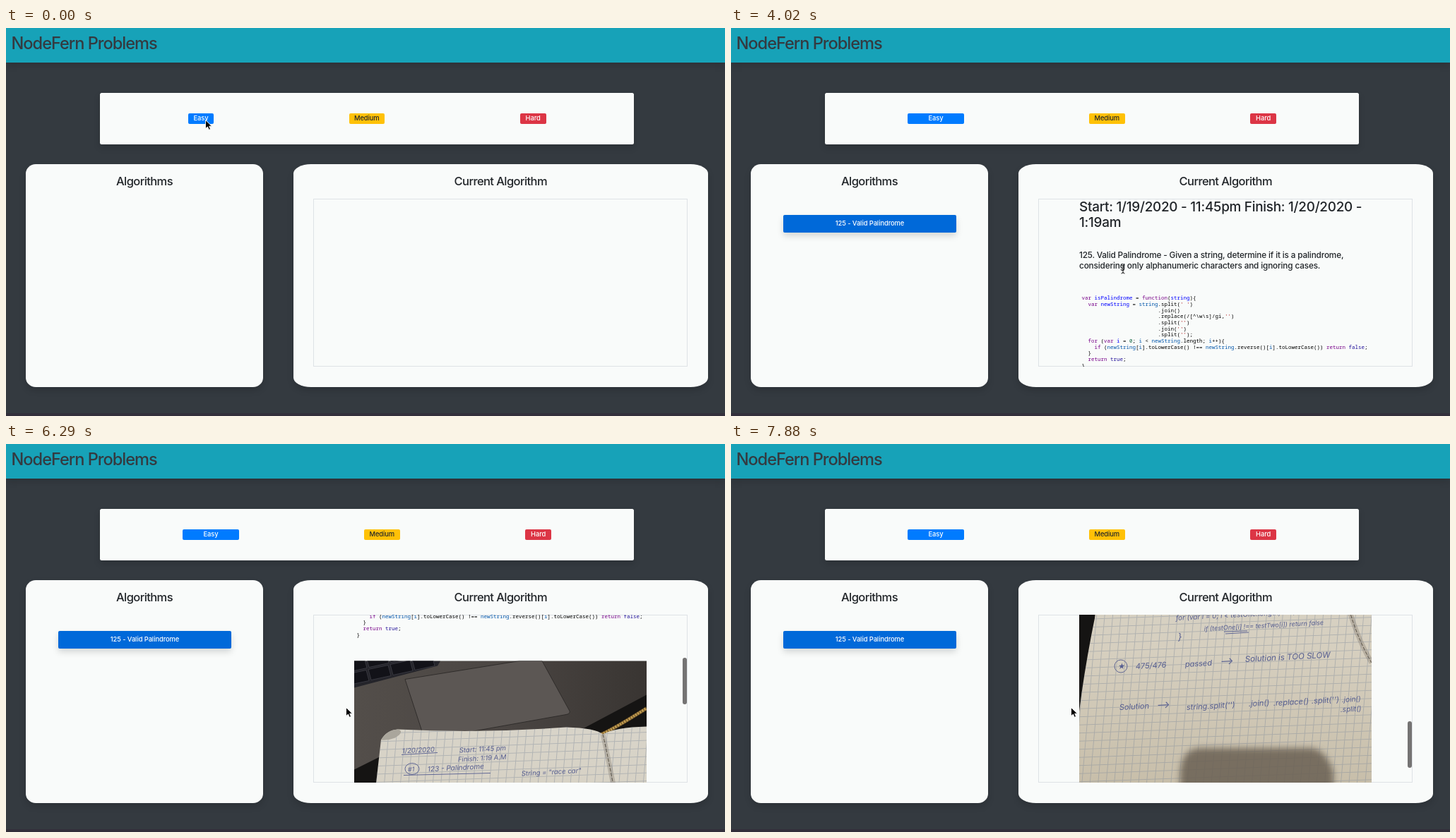
Write an HTML page that moves like this. It is 1018 px wide and 550 px high and loops after 8000 ms.

```html
<!DOCTYPE html>
<html lang="en">
<head>
<meta charset="utf-8">
<title>Problems</title>
<style>
html, body { margin: 0; width: 100%; height: 100%; overflow: hidden; background: #343a40; }
body { position: relative; font: 9.4px/1.5 Inter, "Open Sans", sans-serif; font-optical-sizing: none; color: #212529; }
body > *, #view > *, #page > * { position: absolute; box-sizing: border-box; }
h1, h2, h3, h4, pre { margin: 0; font-weight: 500; line-height: 1.2; white-space: pre; }
nav { left: 0; top: 0; width: 100%; height: 49px; background: #17a2b8; box-shadow: 0 4.7px 9.4px rgba(0,0,0,.15); }
h1 { left: 7.5px; top: 7.5px; font-size: 23.6px; letter-spacing: -.043em; color: #343a40; }
footer { left: 0; bottom: 0; width: 100%; height: 4px; background: #332f3b; }
.card { background: #f9fbfa; box-shadow: 0 4.7px 9.4px rgba(0,0,0,.15); }
.panel { top: 193px; height: 316px; border-radius: 4.2%; }
h2 { padding-top: 14.5px; text-align: center; font-size: 16.5px; letter-spacing: -.035em; }
.btn { top: 120.5px; height: 15.5px; border-radius: 2px; display: flex; align-items: center; justify-content: center; color: #fff; font-weight: 500; letter-spacing: -.01em; white-space: pre; }
#algo { left: 74px; top: 265px; width: 245px; height: 25px; }
#view { left: 435px; top: 242px; width: 530px; height: 238px; box-shadow: inset 0 0 0 1px #dee2e6; overflow: hidden; }
#page { left: 58px; top: 0; width: 414px; height: 826px; }
h3 { top: .5px; font-size: 18.9px; letter-spacing: -.014em; }
h4 { top: 73.4px; font-size: 11.8px; letter-spacing: -.014em; }
pre { left: 3.5px; top: 136.2px; font: 7.5px/8.68px "Noto Sans Mono", "DejaVu Sans Mono", monospace; color: #000; }
pre * { font: inherit; text-decoration: none; }
pre i { color: #708; } pre b { color: #00f; } pre u { color: #05a; }
pre s { color: #a11; } pre em { color: #164; } pre q { color: #219; quotes: none; }
#photo { left: 0; top: 273.5px; }
#thumb { left: 523px; width: 6px; height: 66px; border-radius: 3px; background: #757373; }
#cursor { left: 0; top: 0; overflow: visible; }
</style>
</head>
<body>
<nav></nav>
<h1>NodeFern Problems</h1>
<footer></footer>

<div class="card" style="left:133px;top:92px;width:756px;height:72.5px;border-radius:2.5px"></div>
<div class="btn" id="easy">Easy</div>
<div class="btn" id="medium" style="width:50.5px;background:#ffc107;color:#212529">Medium</div>
<div class="btn" id="hard" style="width:37.3px;background:#dc3545">Hard</div>

<div class="card panel" style="left:28px;width:336px"><h2>Algorithms</h2></div>
<div class="btn" id="algo">125 - Valid Palindrome</div>

<div class="card panel" style="left:406.5px;width:587.5px"><h2>Current Algorithm</h2></div>
<div id="view">
  <div id="page">
    <h3>Start: 1/19/2020 - 11:45pm Finish: 1/20/2020 -
1:19am</h3>
    <h4>125. Valid Palindrome - Given a string, determine if it is a palindrome,
considering only alphanumeric characters and ignoring cases.</h4>
<pre><i>var</i> <b>isPalindrome</b> = <i>function</i>(<b>string</b>){
  <i>var</i> <b>newString</b> = <u>string</u>.split(<s>' '</s>)
                        .join()
                        .replace(/[^\w\s]/gi,<s>''</s>)
                        .split(<s>''</s>)
                        .join(<s>''</s>)
                        .split(<s>''</s>);
  <i>for</i> (<i>var</i> <b>i</b> = <em>0</em>; <u>i</u> &lt; <u>newString</u>.length; <u>i</u>++){
    <i>if</i> (<u>newString</u>[<u>i</u>].toLowerCase() !== <u>newString</u>.reverse()[<u>i</u>].toLowerCase()) <i>return</i> <q>false</q>;
  }
  <i>return</i> <q>true</q>;
}</pre>
    <svg id="photo" width="414" height="552">
      <defs>
        <linearGradient id="metal" x2="1" y2="0">
          <stop stop-color="#534e4a"/><stop offset=".5" stop-color="#4b4643"/><stop offset="1" stop-color="#393532"/>
        </linearGradient>
        <linearGradient id="paper" x2="0" y2="1">
          <stop stop-color="#d8d4c9"/><stop offset=".45" stop-color="#d6cfbf"/><stop offset="1" stop-color="#c2b8a2"/>
        </linearGradient>
        <pattern id="squares" width="11.5" height="11.5" patternUnits="userSpaceOnUse" patternTransform="rotate(-2) skewX(-7)">
          <path d="M0 .5H11.5M.5 0V11.5" stroke="#7d8799" stroke-opacity=".42"/>
        </pattern>
        <filter id="soft" x="-20%" y="-20%" width="140%" height="140%"><feGaussianBlur stdDeviation="5"/></filter>
      </defs>
      <rect width="414" height="552" fill="#151413"/>
      <path d="M0 0H414V48L320 98L40 134L0 154Z" fill="url(#metal)"/>
      <path d="M0 0H122L118 7L0 38Z" fill="#24242a"/>
      <g id="keys" fill="#121218" stroke="#44444d" stroke-width=".7"></g>
      <path d="M72 26L234 0H266L305 71Q306 75 300 76L100 112Z" fill="#5c5754" stroke="#282524" stroke-width=".8"/>
      <path d="M350 104Q368 96 414 67" fill="none" stroke="#6d5328" stroke-width="5"/>
      <path d="M350 104Q368 96 414 67" fill="none" stroke="#c19c50" stroke-width="3.5" stroke-dasharray="2.5 1.2"/>
      <g id="sheet"></g>
      <path d="M38 112Q46 98 62 97Q72 100 58 109Q48 113 38 112" fill="#aaa69c"/>
      <path d="M352 104C368 170 375 250 414 315" fill="none" stroke="#71695c" stroke-opacity=".3" stroke-width="7"/>
      <path d="M352 104C368 170 375 250 414 315" fill="none" stroke="#5a5347" stroke-dasharray="5 2"/>
      <path d="M143 552V470Q146 436 172 436H330Q350 440 360 470V552Z" fill="#6b6152" opacity=".85" filter="url(#soft)"/>
      <g id="notes" fill="#555d90" font-style="italic"></g>
      <g fill="none" stroke="#555d90" stroke-width=".9">
        <path d="M67 133L118 130M70 162L193 159M205 271L238 270M207 274L240 272"/>
        <ellipse cx="82" cy="153" rx="10" ry="8"/><circle cx="59" cy="320" r="9"/>
      </g>
    </svg>
  </div>
  <div id="thumb"></div>
</div>

<svg id="cursor" width="20" height="20">
  <path id="arrow" d="M0 0V12.2L2.9 9.5L4.8 13.8L7 12.9L5.2 8.7H9Z" fill="#000" stroke="#fff" stroke-width=".9"/>
  <path id="hand" d="M3 8V1.4Q4.1 -.1 5.2 1.4V5Q6.4 4.3 7.2 5.3Q8.5 4.8 9.2 5.8Q10.5 5.5 11 6.8V10L9.8 13.5H4.3L.8 8.9Q.3 7 1.8 7.2Z" fill="#fff" stroke="#000" stroke-width=".9"/>
  <path id="ibeam" d="M-2.5 0Q0 0 0 2Q0 0 2.5 0M0 1V11M-2.5 12Q0 12 0 10Q0 12 2.5 12M-1.5 7H1.5" fill="none" stroke="#222" stroke-width="1"/>
</svg>

<script>
const LOOP = 8000;
const $ = id => document.getElementById(id);

// [time, x, y, shape]
const cursorSteps = [
  [0, 282.5, 130.5, 'arrow'], [1080, 274.5, 130.5, 'arrow'], [1380, 272, 130.5, 'hand'],
  [2030, 247, 172, 'arrow'], [2280, 190, 238, 'arrow'], [2510, 157, 271, 'hand'],
  [2800, 154, 270, 'hand'], [3810, 372, 311, 'arrow'], [4020, 555, 336, 'ibeam'],
  [4800, 515, 358, 'ibeam'], [5010, 481.5, 373.5, 'arrow']
];
// [time, scroll offset]
const scrollSteps = [
  [0, 0], [5430, 12], [5640, 62], [5850, 118], [6080, 169], [6290, 208.5],
  [6500, 237], [6720, 265], [6940, 291.5], [7170, 345], [7410, 410], [7650, 470], [7880, 521]
];
// [x, baseline, size, text]
const notes = [
  [68, 131, 9.5, '1/20/2020'], [149, 130, 9.5, 'Start: 11:45 pm'], [147, 143, 9.5, 'Finish: 1:19 A.M'],
  [76, 157, 9, '#1'], [104, 157, 10, '123 - Palindrome'], [237, 163, 9.5, 'String = "race car"'],
  [110, 190, 11, 'def function (string)'],
  [118, 206, 9.8, 'var formatString = string ⟶ return to "racecar"'],
  [120, 223, 9.8, "var testOne = string.split('') ⟶ ['r','a','c',...]"],
  [120, 239, 9.8, "var testTwo = format.reverse() ⟶ ['r','a','c',...]"],
  [137, 255, 9.8, 'for (var i = 0; i < testOne.length; i++){'],
  [177, 270, 9, 'if (testOne[i] !== testTwo[i]) return false'],
  [140, 283, 13, '}'], [55, 324, 10, '★'],
  [80, 324, 11, '475/476'], [150, 321, 11, 'passed'], [200, 318, 14, '⟶'], [235, 314, 11.5, 'Solution is TOO SLOW'],
  [57, 382, 11, 'Solution'], [110, 380, 14, '⟶'],
  [152, 382, 11, "string.split('')"], [240, 377, 11, '.join()'], [275, 376, 11, '.replace()'],
  [329, 373, 11, ".split('')"], [372, 371, 10, '.join()'], [370, 385, 10, '.split()']
];

const svg = (parent, tag, attrs, text = '') => {
  const node = document.createElementNS(parent.namespaceURI, tag);
  for (const key in attrs) node.setAttribute(key, attrs[key]);
  node.textContent = text;
  parent.append(node);
};

for (const [x, y, size, text] of notes)
  svg($('notes'), 'text', { 'font-size': size, transform: `translate(${x} ${y}) rotate(-3)` }, text);

for (let row = 0; row < 2; row++)
  for (let col = 0; col < 4; col++) {
    const x = col * 31 - 14 + row * 3, y = row * 18 + 1 - col * 7;
    svg($('keys'), 'path', { d: `M${x} ${y}l28 -6l4 15l-28 6z` });
  }

const sheet = 'M62 97Q180 103 300 94Q342 95 352 104Q370 94 414 93V552H0V384Q8 320 22 252L38 112Q46 98 62 97Z';
for (const fill of ['url(#paper)', 'url(#squares)']) svg($('sheet'), 'path', { d: sheet, fill });

const stepAt = (steps, t) => steps.findLast(step => step[0] <= t);
const show = (node, on) => { node.style.visibility = on ? 'visible' : 'hidden'; };

function render(t) {
  const opened = t >= 1820, chosen = t >= 3310;

  const easy = $('easy').style;
  easy.left = opened ? '250px' : '257.7px';
  easy.width = opened ? '80px' : '36.5px';
  easy.background = t >= 1380 && t < 2030 ? '#0069d9' : '#007bff';
  easy.boxShadow = opened && !chosen ? '0 0 0 1.9px rgba(38,143,255,.5)' : 'none';
  $('medium').style.left = opened ? '507px' : '485.5px';
  $('hard').style.left = opened ? '735px' : '727.5px';

  const algo = $('algo').style;
  show($('algo'), opened);
  algo.background = t >= 2800 ? '#0069d9' : '#007bff';
  algo.boxShadow = chosen ? '0 4.7px 9.4px rgba(0,0,0,.15)' : '0 6px 1px 1px #e3e6ea';

  const scroll = stepAt(scrollSteps, t)[1];
  show($('page'), chosen);
  $('page').style.transform = `translateY(${-scroll}px)`;
  show($('thumb'), t >= 5430);
  $('thumb').style.top = 4.5 + .2885 * (scroll - 12) + 'px';

  const [, x, y, shape] = stepAt(cursorSteps, t);
  $('cursor').style.transform = `translate(${x}px, ${y}px)`;
  for (const id of ['arrow', 'hand', 'ibeam']) show($(id), id === shape);
}

const start = performance.now();
function tick() {
  render((performance.now() - start) % LOOP);
  requestAnimationFrame(tick);
}
tick();
</script>
</body>
</html>
```
